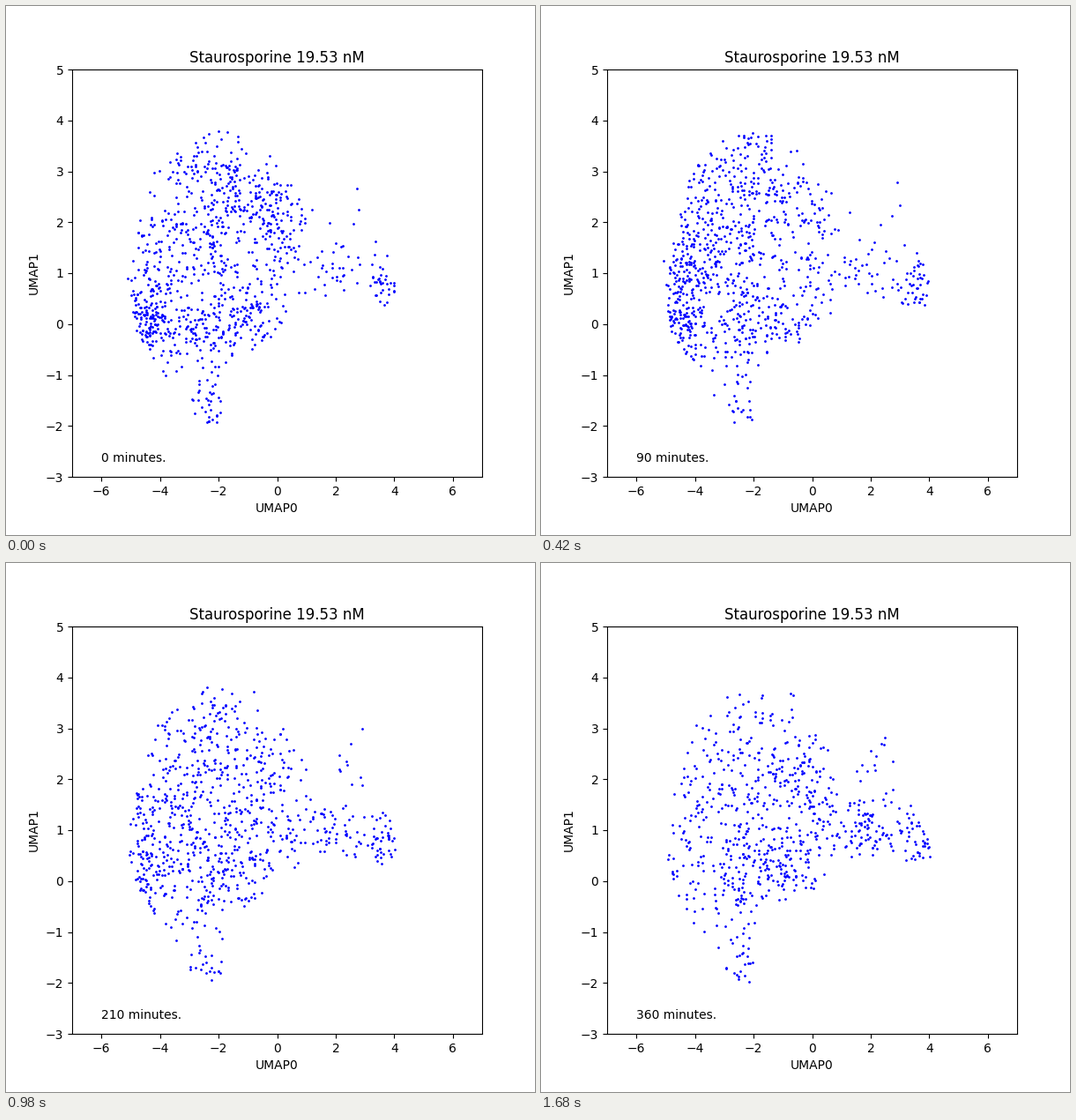
Animation, 600 px wide and 600 px high, one loop 1820 ms. Source, as a matplotlib script:

```python
import numpy as np
import matplotlib.pyplot as plt
from matplotlib.animation import FuncAnimation
from matplotlib.path import Path

FRAMES, STEP_MS, STEP_MIN = 13, 140, 30
DENSITY = 0.84

# Region that the cloud of cells fills
OUTLINE = Path([
    (-5.12, 0.6), (-4.8, -0.2), (-3.6, -1.2), (-2.8, -2), (-2, -1.98),
    (-1.7, -0.75), (-0.5, -0.38), (0.4, 0), (1.8, 0.47), (3.7, 0.28),
    (4.2, 0.4), (3.8, 1.3), (3.1, 2), (3.2, 3.1), (0.9, 2.3), (0.3, 3),
    (-0.7, 3.75), (-2.4, 3.82), (-3.5, 3.45), (-4.2, 3), (-5.1, 1.2)])

# Each group: centre, spread, then its size at the key steps
KEYS = 0, 2, 12
GROUPS = [
    (-4.4, 0.1, .38, .45, 165, 145, 30),
    (-4.3, 1.2, .55, .55, 60, 115, 30),
    (-3.6, 2.2, .6, .6, 70, 130, 35),
    (-2.5, 3.2, .8, .35, 65, 75, 32),
    (-2.4, 1, .95, .75, 165, 215, 205),
    (-2.7, -.2, .75, .4, 110, 95, 45),
    (-1, .1, .6, .4, 100, 70, 75),
    (-1.6, 2.5, .65, .5, 130, 95, 65),
    (-.15, 2.3, .55, .42, 130, 40, 70),
    (-.1, 1.1, .6, .6, 60, 55, 95),
    (1.8, 1, .6, .35, 38, 30, 105),
    (3.55, .8, .3, .3, 40, 55, 48),
    (-2.5, -1.6, .35, .4, 42, 27, 31),
    (2.5, 2.4, .5, .45, 6, 4, 17),
]


def cloud(step):
    rng = np.random.default_rng(100 + step)
    parts = []
    for cx, cy, sx, sy, *sizes in GROUPS:
        n = round(DENSITY * np.interp(step, KEYS, sizes))
        pts = rng.normal((cx, cy), (sx, sy), (10 * n + 40, 2))
        parts.append(pts[OUTLINE.contains_points(pts)][:n])
    return np.vstack(parts)


fig, ax = plt.subplots(figsize=(6, 6), dpi=100)
ax.set(xlim=(-7, 7), ylim=(-3, 5), xlabel="UMAP0", ylabel="UMAP1",
       title="Staurosporine 19.53 nM")
dots, = ax.plot([], [], "o", color="blue", markersize=1)
clock = ax.text(-6, -2.7, "")


def update(step):
    dots.set_data(*cloud(step).T)
    clock.set_text(f"{step * STEP_MIN} minutes.")
    return dots, clock


anim = FuncAnimation(fig, update, frames=FRAMES, interval=STEP_MS,
                     repeat=True, repeat_delay=0)
plt.show()
```
